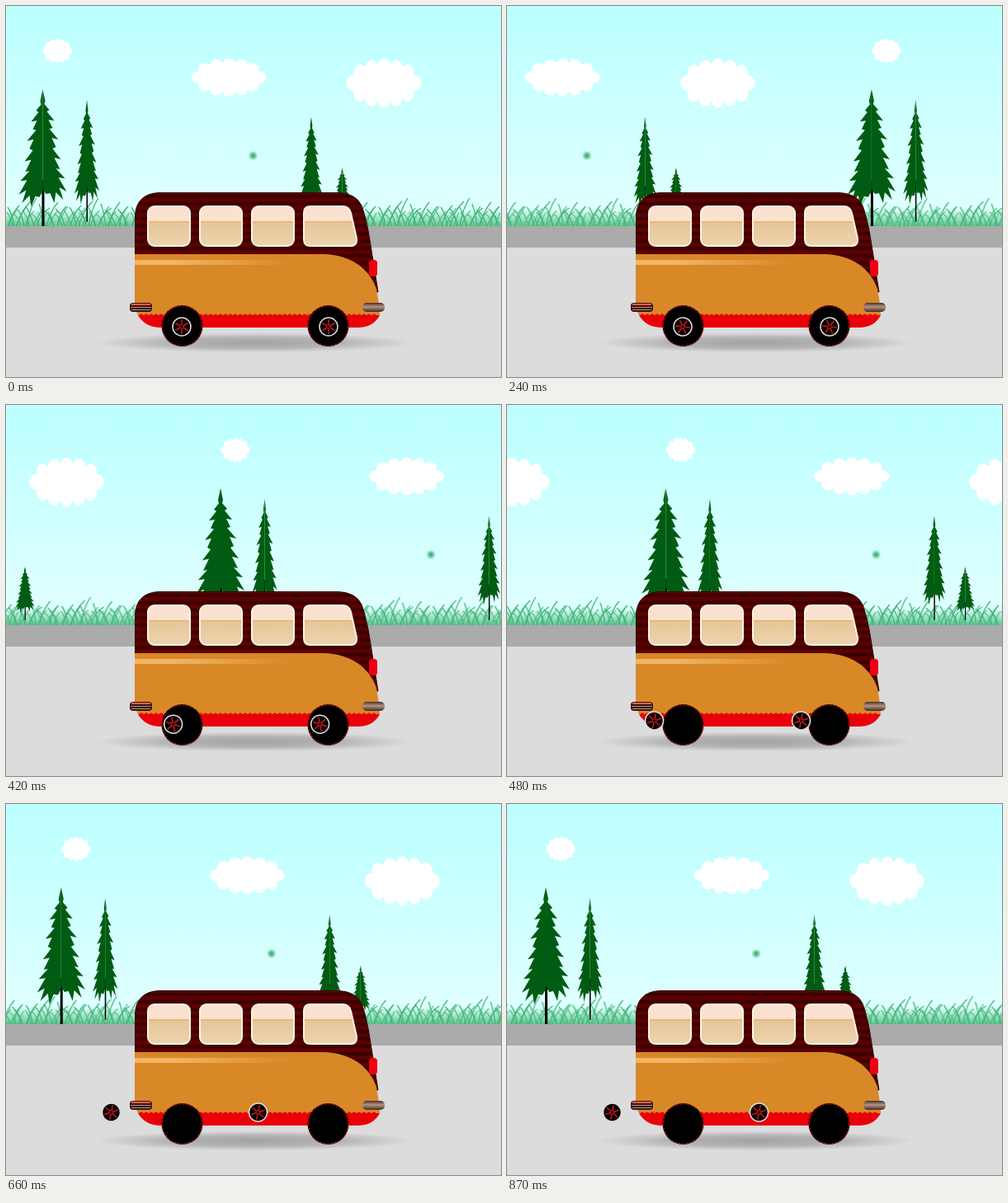
Animation of 600 by 450 pixels, one loop 900 ms. Source, as an HTML page without scripts:

```html
<!DOCTYPE html>
<html lang="en">
<head>
<meta charset="utf-8">
<title>Bus ride</title>
<style>
  @property --frame { syntax: "<number>"; inherits: true; initial-value: 0; }

  html, body { margin: 0; width: 100%; height: 100%; overflow: hidden; }
  svg { display: block; width: 600px; height: 450px; animation: tick 900ms steps(30) infinite; }
  @keyframes tick { from { --frame: 0; } to { --frame: 30; } }

  /* Steady cruise for 12 frames, then a quadratic slow-down. */
  .scenery {
    --left: clamp(0, 1 - (var(--frame) - 12) / 13.5, 1);
    transform: translateX(calc(-25.33px * min(var(--frame), 12) - 293.5px * (1 - var(--left) * var(--left))));
  }

  /* Hubs spin in place, then slide off their tyres. */
  .hub {
    --s: clamp(0, (var(--frame) - 12) / 9.2, 1);
    --slide: (var(--s) * var(--s) * (3 - 2 * var(--s)));
    transform: translate(calc(-85.5px * var(--slide)), calc(-15px * var(--slide)))
               rotate(calc(12deg * min(var(--frame), 21)));
  }
</style>
</head>
<body>
<svg viewBox="0 0 600 450">
  <defs>
    <linearGradient id="sky" x2="0" y2="1">
      <stop stop-color="#bff"/><stop offset="1" stop-color="#e2ffff"/>
    </linearGradient>
    <linearGradient id="shine">
      <stop stop-color="#f3b566"/><stop offset=".25" stop-color="#f0b566"/>
      <stop offset="1" stop-color="#d98827"/>
    </linearGradient>
    <linearGradient id="chrome" x2="0" y2="1">
      <stop stop-color="#4a302c"/><stop offset=".45" stop-color="#b59582"/><stop offset="1" stop-color="#3f2926"/>
    </linearGradient>
    <linearGradient id="glass" x2="0" y2="1">
      <stop offset=".37" stop-color="#fbe1cf"/><stop offset=".37" stop-color="#e9a959"/>
      <stop offset=".42" stop-color="#e6c698"/><stop offset="1" stop-color="#ecd3ae"/>
    </linearGradient>
    <radialGradient id="shadow">
      <stop stop-color="#a2a2a2"/><stop offset=".55" stop-color="#b4b4b4"/>
      <stop offset="1" stop-color="#dcdcdc"/>
    </radialGradient>
    <radialGradient id="spot">
      <stop stop-color="#2e9f60"/><stop offset=".4" stop-color="#3cb371" stop-opacity=".75"/>
      <stop offset="1" stop-color="#3cb371" stop-opacity="0"/>
    </radialGradient>
    <linearGradient id="turf" x2="0" y2="1">
      <stop stop-color="#3cb371" stop-opacity="0"/><stop offset="1" stop-color="#3cb371" stop-opacity=".75"/>
    </linearGradient>

    <pattern id="planks" width="8" height="9" y="229" patternUnits="userSpaceOnUse">
      <path fill="#5c0000" d="M0 0h8v9H0z"/><path fill="#3a0000" d="M0 0h8v4H0z"/>
    </pattern>
    <pattern id="tallGrass" width="75" height="40" y="228" patternUnits="userSpaceOnUse">
      <path fill="none" stroke="#3cb371" stroke-width="1.3" d="M3 40Q6 24 16 14M10 40Q8 24 2 16M13 40Q18 20 30 9M22 40Q20 24 13 18M25 40Q28 18 37 5M34 40Q30 24 24 15M37 40Q41 24 53 17M46 40Q44 22 40 12M49 40Q54 20 63 10M58 40Q54 26 47 20M62 40Q64 24 73 15M71 40Q69 25 60 18"/>
    </pattern>
    <pattern id="shortGrass" width="50" height="30" y="238" patternUnits="userSpaceOnUse">
      <path fill="none" stroke="#3cb371" stroke-width="1.4" opacity=".75" d="M2 30Q5 18 13 10M8 30Q6 18 1 12M12 30Q17 16 25 5M18 30Q16 19 9 14M23 30Q26 17 34 11M29 30Q26 18 20 9M33 30Q37 18 46 7M40 30Q38 18 31 14M43 30Q45 20 49 13M48 30Q46 18 38 12"/>
    </pattern>

    <g id="cloud" fill="#fff">
      <ellipse rx="38" ry="17" stroke="#fff" stroke-width="15" stroke-linecap="round" stroke-dasharray="0 1" pathLength="12"/>
      <ellipse rx="41" ry="19.5"/>
    </g>

    <path id="boughs" d="M0 0L3 14 2 18 8 25 5 27 14 38 7 37 12 47 8 48 19 61 11 59 16 70 12 72 22 85 14 83 21 97 16 96 27 108 19 107 29 124 20 119 25 134 16 125 14 138 9 126 4 127 0 120z"/>
    <g id="tree" fill="#005c12">
      <path fill="#000" d="M-1 110H2V166H-1z"/>
      <use href="#boughs"/>
      <use href="#boughs" transform="scale(-1 1.03)"/>
    </g>

    <g id="land">
      <use href="#cloud" transform="translate(62.5 54.5) scale(.385 .6)"/>
      <use href="#cloud" transform="translate(270 86.5) scale(1 .94)"/>
      <use href="#cloud" transform="translate(458 93.5) scale(1 1.22)"/>
      <circle cx="299.5" cy="181.5" r="6" fill="url(#spot)"/>
      <path fill="url(#tallGrass)" d="M0 228H600V267H0z"/>
      <path fill="url(#shortGrass)" d="M0 238H600V267H0z"/>
      <path fill="url(#turf)" d="M0 247H600V267H0z"/>
      <use href="#tree" transform="translate(44.5 101)"/>
      <use href="#tree" transform="translate(98 114) scale(.52 .89)"/>
      <use href="#tree" transform="translate(370 134.5) scale(.47 .76)"/>
      <use href="#tree" transform="translate(407.5 196) scale(.4 .39)"/>
    </g>

    <rect id="window" y="243" width="51" height="48" rx="8" fill="url(#glass)" stroke="#fff3e0" stroke-width="2"/>

    <g id="tyre">
      <circle r="25"/>
      <circle r="24" fill="none" stroke="#d8101c" stroke-width=".9" stroke-dasharray="3 1.5"/>
    </g>
    <g id="hub" class="hub">
      <circle r="11" stroke="#ddd" stroke-width="1.5"/>
      <path stroke="#c8151d" stroke-width="1.6" d="M0-9V9M-7.8-4.5L7.8 4.5M-7.8 4.5L7.8-4.5"/>
      <circle r="2.2" stroke="#c8151d"/>
    </g>
  </defs>

  <path fill="url(#sky)" d="M0 0H600V267H0z"/>
  <g class="scenery">
    <use href="#land"/>
    <use href="#land" x="600"/>
  </g>
  <path fill="#ababab" d="M0 267H600V293H0z"/>
  <path fill="#dcdcdc" d="M0 293H600V450H0z"/>
  <ellipse cx="301" cy="408.5" rx="192" ry="12" fill="url(#shadow)"/>

  <!-- body -->
  <path fill="url(#planks)" stroke="#3a0000" d="M156.5 305V254Q158 228 185 226.5H402Q424 227 431 242Q437 258 441 284L451 347 430 345z"/>
  <path fill="#d98827" d="M156 301H385C418 302 440 318 449 343Q452 358 453 375H160Q156 368 156 360z"/>
  <path fill="url(#shine)" d="M156 308H345V314H156z"/>
  <path fill="#ea0009" d="M160 375H453Q446 389 428 390H186Q168 389 160 375z"/>
  <path fill="none" stroke="#ea0009" stroke-width="5" stroke-linecap="round" stroke-dasharray="0 6" d="M164 376H450"/>
  <use href="#window" x="172"/>
  <use href="#window" x="235"/>
  <use href="#window" x="298"/>
  <path fill="url(#glass)" stroke="#fff3e0" stroke-width="2" d="M369 243H408Q416 243 418 251L425 282Q426 291 417 291H369Q361 291 361 283V251Q361 243 369 243z"/>
  <rect x="440" y="308" width="10" height="20" rx="4" fill="#ee0012"/>

  <!-- bumpers -->
  <rect x="432" y="360" width="27" height="11" rx="5" fill="url(#chrome)"/>
  <rect x="150" y="360" width="27" height="11" rx="4" fill="#351414"/>
  <path stroke="#f0604a" stroke-width="2" d="M152 362H175"/>
  <path stroke="#b98f80" stroke-width="1.2" d="M151 365.5H176M152 368.5H175"/>

  <!-- wheels -->
  <use href="#tyre" x="213.5" y="388"/>
  <use href="#tyre" x="390.5" y="388"/>
  <use href="#hub" x="213" y="389"/>
  <use href="#hub" x="391" y="389"/>
</svg>
</body>
</html>
```
